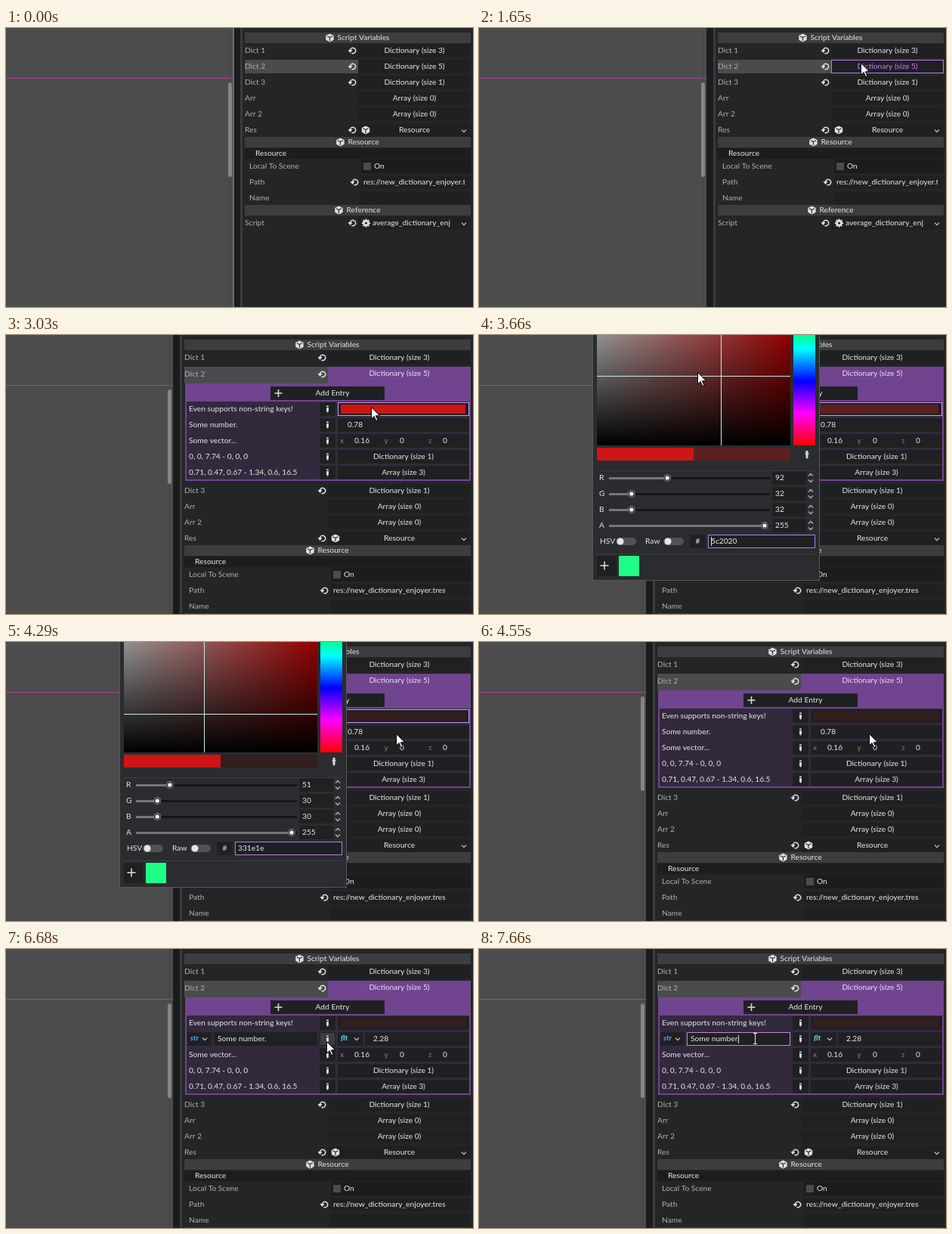
These frames come from a looping animation (618x369 px, 8 s). An HTML page with a canvas:

```html
<!DOCTYPE html>
<html lang="en">
<head>
<meta charset="utf-8">
<title>Dictionary inspector</title>
<style>
  html, body { margin: 0; width: 618px; height: 369px; overflow: hidden; background: #4b4c4b; }
  canvas { display: block; }
</style>
</head>
<body>
<canvas width="618" height="369"></canvas>
<script>
const c = document.querySelector('canvas').getContext('2d');
const LOOP = 8000, RIGHT = 615;
const FONT = '500 10.2px Lato, "Open Sans", sans-serif';
const LIGHT = '#d8d8d8', DIM = '#a4a5a6', FIELD = '#1f2022', EDGE = '#212224', BG = '#242527';
const ACCENT = '#b87af0', PURPLE = '#70448f';

// Pointer moves: start, end, number of steps, then evenly timed points
const moves = [
  [550, 1180, 8, 513,308, 492,215, 462,110, 448,50, 470,16, 505,46],
  [2310, 2750, 6, 503,56, 500,66, 492,80, 486,90, 484,94, 483,95],
  [3120, 3750, 8, 470,95, 440,85, 400,70, 360,55, 345,50, 320,54, 289,49, 275,66],
  [3840, 4290, 6, 262,85, 262,95, 275,97, 350,104, 440,112, 516,121],
  [4470, 5210, 10, 516,121, 505,123, 484,120, 470,121],
  [6070, 6250, 3, 470,121, 452,124, 438,126],
  [6330, 6490, 3, 432,128, 427,126, 424,123],
  [6680, 7480, 10, 424,122, 431,121, 426,119, 424,119],
  [7570, 7660, 2, 395,118, 365,118]
];

function pointer(t) {
  const move = moves.filter(m => m[0] <= t).pop();
  if (!move || (t >= 5300 && t < 6070)) return null;
  const [start, end, steps, ...pts] = move;
  const k = Math.min(steps - 1, Math.floor((t - start) / (end - start) * (steps - 1) + 1e-6));
  const pos = k / (steps - 1) * (pts.length / 2 - 1);
  const i = Math.min(Math.floor(pos), pts.length / 2 - 2), f = pos - i;
  const mix = j => pts[2 * i + j] + (pts[2 * i + 2 + j] - pts[2 * i + j]) * f;
  return { x: Math.round(mix(0)), y: Math.round(mix(1)) };
}

// The picker's crosshair trails the pointer by one step
function pickedColor(t) {
  const p = t < 3480 ? { x: 385, y: -61 } : pointer(Math.min(t, 4020) - 90);
  const s = (p.x - 154.75) / 256, v = 1 - (p.y + 110) / 256;
  const r = Math.round(255 * v), g = Math.round(255 * v * (1 - s));
  return { ...p, rgb: [r, g, g], css: `rgb(${r},${g},${g})` };
}

const inside = (p, x, y, w, h) => p && p.x >= x && p.x < x + w && p.y >= y && p.y < y + h;

function rect(x, y, w, h, color) {
  c.fillStyle = color;
  c.fillRect(x, y, w, h);
}

function frame(x, y, w, h, color) {
  c.strokeStyle = color;
  c.lineWidth = 1;
  c.strokeRect(x + .5, y + .5, w - 1, h - 1);
}

function text(s, x, y, color = LIGHT, align = 'left', font = FONT) {
  c.font = font;
  c.textAlign = align;
  c.fillStyle = color;
  c.fillText(s, x, y + 3);
}

function line(color, width, ...pts) {
  c.strokeStyle = color;
  c.lineWidth = width;
  c.beginPath();
  for (let i = 0; i < pts.length; i += 2) c.lineTo(pts[i], pts[i + 1]);
  c.stroke();
}

function roundLine(...args) {
  c.lineCap = 'round';
  line(...args);
  c.lineCap = 'butt';
}

function shape(color, x, y, ...pts) {
  c.fillStyle = color;
  c.beginPath();
  for (let i = 0; i < pts.length; i += 2) c.lineTo(x + pts[i], y + pts[i + 1]);
  c.closePath();
  c.fill();
}

function disc(x, y, r, color) {
  c.fillStyle = color;
  c.beginPath();
  c.arc(x, y, r, 0, 7);
  c.fill();
}

function cube(x, y) {
  shape('#e0e0e0', x, y, 0,-5.5, 5.2,-3, 5.2,2.8, 0,5.5, -5.2,2.8, -5.2,-3);
  line('#303133', 1.2, x - 3.6, y - 2.2, x, y - .4, x + 3.6, y - 2.2);
  line('#303133', 1.2, x, y - .4, x, y + 4.2);
}

function reload(x, y) {
  c.strokeStyle = '#e0e0e0';
  c.lineWidth = 1.6;
  c.beginPath();
  c.arc(x + 1, y, 3.7, -2.9, 2);
  c.stroke();
  shape('#e0e0e0', x, y, -5.5,-1, .5,-1, -2.5,3);
}

function gear(x, y) {
  for (let i = 0; i < 8; i++) {
    const a = i * Math.PI / 4, dx = Math.cos(a), dy = Math.sin(a);
    line('#e0e0e0', 2.2, x + dx * 2, y + dy * 2, x + dx * 5.5, y + dy * 5.5);
  }
  disc(x, y, 4, '#e0e0e0');
  disc(x, y, 1.6, FIELD);
}

const chevron = (x, y, d = 1) => line('#b4b4b4', 1.3, x - 3, y - 1.5 * d, x, y + 1.5 * d, x + 3, y - 1.5 * d);

function plus(x, y, r) {
  line(LIGHT, 1.6, x - r, y, x + r, y);
  line(LIGHT, 1.6, x, y - r, x, y + r);
}

function box(x, y, w, h = 18, fill = FIELD, edge = EDGE) {
  rect(x, y, w, h, fill);
  frame(x, y, w, h, edge);
}

function button(label, x, y, w, color) {
  box(x, y - 9, w);
  text(label, x + w / 2, y, color, 'center');
}

function heading(label, left, y) {
  rect(left, y - 7, RIGHT - left, 14, '#3c3d3f');
  c.font = FONT;
  const x = (left + RIGHT - c.measureText(label).width - 15) / 2;
  cube(x + 5, y);
  text(label, x + 15, y);
}

function inspector(t, open) {
  const left = open ? 236 : 316, mid = (left + 616) / 2, w = RIGHT - mid, shift = open ? 134 : 0;
  const edge = left - 15;
  rect(0, 0, 618, 369, '#4b4c4b');
  rect(0, 66, edge, 1, '#a8459b');
  rect(edge - 5, 0, 1, 369, '#434443');
  roundLine('#858585', 5, edge - 4.5, 74.5, edge - 4.5, 194.5);
  rect(edge, 0, 618, 369, '#1b1c1e');
  if (t < 1650) rect(edge - 1, 0, 2, 369, '#6b6c6b');
  rect(left - 6, 0, 3, 369, '#3a3b3d');
  rect(left - 3, 0, 618, 369, BG);

  const row = (label, y, value, reset) => {
    text(label, left, y, DIM);
    if (reset) reload(mid - 8, y);
    button(value, mid, y, w);
  };
  heading('Script Variables', left, 13);
  row('Dict 1', 30, 'Dictionary (size 3)', true);
  rect(left, 42, mid - left, open ? 22 : 18, '#4a4b4c');
  row('Dict 2', open ? 52 : 51, '', true);
  if (open) rect(mid, 42, w, 22, PURPLE);
  const pressed = t >= 1650 && !open;
  if (pressed) frame(mid, 42, w, 18, ACCENT);
  text('Dictionary (size 5)', mid + w / 2, 51, pressed ? ACCENT : open ? '#e5d3f2' : LIGHT, 'center');

  row('Dict 3', 72 + shift, 'Dictionary (size 1)', true);
  row('Arr', 93 + shift, 'Array (size 0)');
  row('Arr 2', 114 + shift, 'Array (size 0)');
  row('Res', 135 + shift, 'Resource', true);
  cube(mid + 10, 135 + shift);
  chevron(606, 136 + shift);
  heading('Resource', left, 151 + shift);
  rect(left, 159 + shift, RIGHT - left, 14, '#1c1d1f');
  text('Resource', left + 14, 166 + shift);
  text('Local To Scene', left + 6, 183 + shift, DIM);
  rect(mid + 4, 174 + shift, w - 4, 18, '#1b1c1e');
  rect(mid + 7, 178 + shift, 10, 10, '#4a4b4c');
  text('On', mid + 21, 183 + shift);
  text('Path', left + 6, 204 + shift, DIM);
  reload(mid - 5, 204 + shift);
  box(mid + 3, 195 + shift, w - 3);
  c.save();
  c.beginPath();
  c.rect(mid, 190 + shift, 607 - mid, 30);
  c.clip();
  text('res://new_dictionary_enjoyer.tres', mid + 7, 204 + shift);
  c.restore();
  text('Name', left + 6, 225 + shift, DIM);
  box(mid + 3, 216 + shift, w - 3);
  heading('Reference', left, 241 + shift);
  row('Script', 258 + shift, '', true);
  gear(mid + 10.5, 258 + shift);
  text('average_dictionary_enj', mid + 19, 258 + shift);
  chevron(606, 259 + shift);
}

function typeMenu(label, x, w, color) {
  box(x, 110, w);
  text(label, x + 4, 118, color, 'left', 'italic 900 9.5px Lato, sans-serif');
  chevron(x + w - 9, 119);
}

function entries(t, p) {
  const editing = t >= 6680, step = Math.max(0, Math.min(7, Math.floor((t - 5450) / 90)));
  const value = (.78 + 1.5 * step / 7).toFixed(2);
  rect(237, 64, 378, 129, PURPLE);
  rect(239, 88, 374, 103, '#33293d');
  box(350, 68, 151, 18, inside(p, 350, 68, 151, 18) ? '#38393c' : FIELD);
  plus(360.5, 77, 5);
  text('Add Entry', 432, 77, LIGHT, 'center');

  ['Even supports non-string keys!', 'Some number.', 'Some vector...', '0, 0, 7.74 - 0, 0, 0',
    '0.71, 0.47, 0.67 - 1.34, 0.6, 16.5'].forEach((label, i) => {
    const y = 98 + 21 * i;
    if (i !== 1 || !editing) text(label, 242, y);
    box(415, y - 9, 21, 18, inside(p, 415, y - 9, 21, 18) ? '#3c3d40' : FIELD);
    shape('#d8d8d8', 425.5, y, -1.5,-4.5, 1.5,-4.5, 1.5,2.5, 0,5, -1.5,2.5);
    line(FIELD, 1, 423, y - 2.5, 428, y - 2.5);
  });

  box(439, 89, 174);
  rect(443, 92, 165, 12, pickedColor(t).css);
  if (t >= 2660 && t < 4470) frame(439, 89, 174, 18, '#c79af0');

  if (editing) {
    typeMenu('str', 240, 32, '#4f8fe6');
    box(275, 110, 137);
    text('Some number.', 280, 119);
    if (t >= 7570) {
      frame(275, 110, 137, 18, '#bd86e2');
      line(LIGHT, 1, 343.5, 114, 343.5, 125);
    }
    typeMenu('flt', 439, 34, '#55c4dc');
    box(475, 110, 138);
    text(value, 486, 119);
  } else {
    box(439, 110, 174, 18, FIELD, t >= 5210 ? '#c98ff5' : EDGE);
    text(value, 452, 119);
  }

  box(439, 131, 174);
  [['x', '0.16', '#a0705c'], ['y', '0', '#5d8a55'], ['z', '0', '#6c62b0']].forEach(([axis, v, color], i) => {
    text(axis, 442 + i * 58.5, 140, color);
    text(v, [471, 524, 581][i], 140, LIGHT, 'center');
  });
  button('Dictionary (size 1)', 439, 161, 174);
  button('Array (size 3)', 439, 182, 174);
}

function gradient(x0, y0, x1, y1, colors) {
  const g = c.createLinearGradient(x0, y0, x1, y1);
  colors.forEach((color, i) => g.addColorStop(i / (colors.length - 1), color));
  return g;
}

function toggle(x, y) {
  roundLine('#505255', 10, x + 5, y, x + 22, y);
  disc(x + 6, y, 4.5, '#e6e6e6');
}

function picker(t) {
  const pick = pickedColor(t);
  rect(150, 0, 301, 325, '#55575a');
  rect(151, 0, 299, 324, '#2a2c2f');
  rect(156, 0, 256, 146, gradient(156, 0, 412, 0, ['#fff', '#f00']));
  rect(156, 0, 256, 146, gradient(0, -110, 0, 146, ['rgba(0,0,0,0)', '#000']));
  rect(416, 0, 29, 146, gradient(0, -110, 0, 146, ['#f00', '#ff0', '#0f0', '#0ff', '#00f', '#f0f', '#f00']));
  line('#c4ecea', 1, pick.x + .5, 0, pick.x + .5, 146);
  if (pick.y >= 0) line('#c4ecea', 1, 156, pick.y + .5, 412, pick.y + .5);
  rect(156, 149, 128, 17, pickedColor(0).css);
  rect(284, 149, 128, 17, pick.css);
  shape('#d8d8d8', 434, 158, -1.5,-5, 1.5,-5, 1.5,-2, 3,-1, 1.5,0, 1.5,4, 0,6, -1.5,4, -1.5,0, -3,-1, -1.5,-2);
  rect(156, 179, 289, 1, '#3a3c3f');

  [...pick.rgb, 255].forEach((v, i) => {
    const y = 189 + 21 * i, x = 176.5 + v * .79;
    text('RGBA'[i], 159, y);
    rect(172, y - 1, 213, 3, '#151618');
    rect(172, y - 1, x - 172, 3, '#747678');
    disc(x, y, 5, '#77797b');
    disc(x, y, 4, '#3a3c3f');
    disc(x, y, 2.6, '#f2f2f2');
    box(388, y - 9, 45);
    text(v, 392, y);
    chevron(439, y - 4, -1);
    chevron(439, y + 4);
  });

  text('HSV', 160, 273);
  toggle(181, 273);
  text('Raw', 220, 273);
  toggle(244, 273);
  button('#', 279, 273, 21);
  box(303, 264, 142, 18, FIELD, ACCENT);
  text(pick.rgb.map(v => v.toString(16).padStart(2, '0')).join(''), 307, 273);
  if (t < 3840) rect(307, 267, 1, 12, LIGHT);
  rect(156, 289, 289, 1, '#3a3c3f');
  box(156, 292, 26, 27);
  plus(166, 305, 5.5);
  rect(185, 292, 27, 27, '#1fff87');
}

function drawPointer(t, p) {
  if (!p) return;
  if (t >= 7570) {
    line('#eee', 1, p.x + .5, 111, p.x + .5, 126);
    line('#eee', 1, p.x - 2, 111.5, p.x + 3, 111.5);
    line('#eee', 1, p.x - 2, 125.5, p.x + 3, 125.5);
    return;
  }
  shape('#fff', p.x, p.y, .5,.5, .5,16, 4,12.5, 6.8,18.5, 9,17.5, 6.3,11.8, 11.5,11.8);
  c.strokeStyle = '#000';
  c.lineWidth = 1;
  c.stroke();
}

function draw(t) {
  const open = t >= 1840, p = pointer(t);
  inspector(t, open);
  if (open) entries(t, p);
  if (t >= 3120 && t < 4470) picker(t);
  drawPointer(t, p);
}

const begin = performance.now();
function tick() {
  draw((performance.now() - begin) % LOOP);
  requestAnimationFrame(tick);
}
tick();
</script>
</body>
</html>
```
